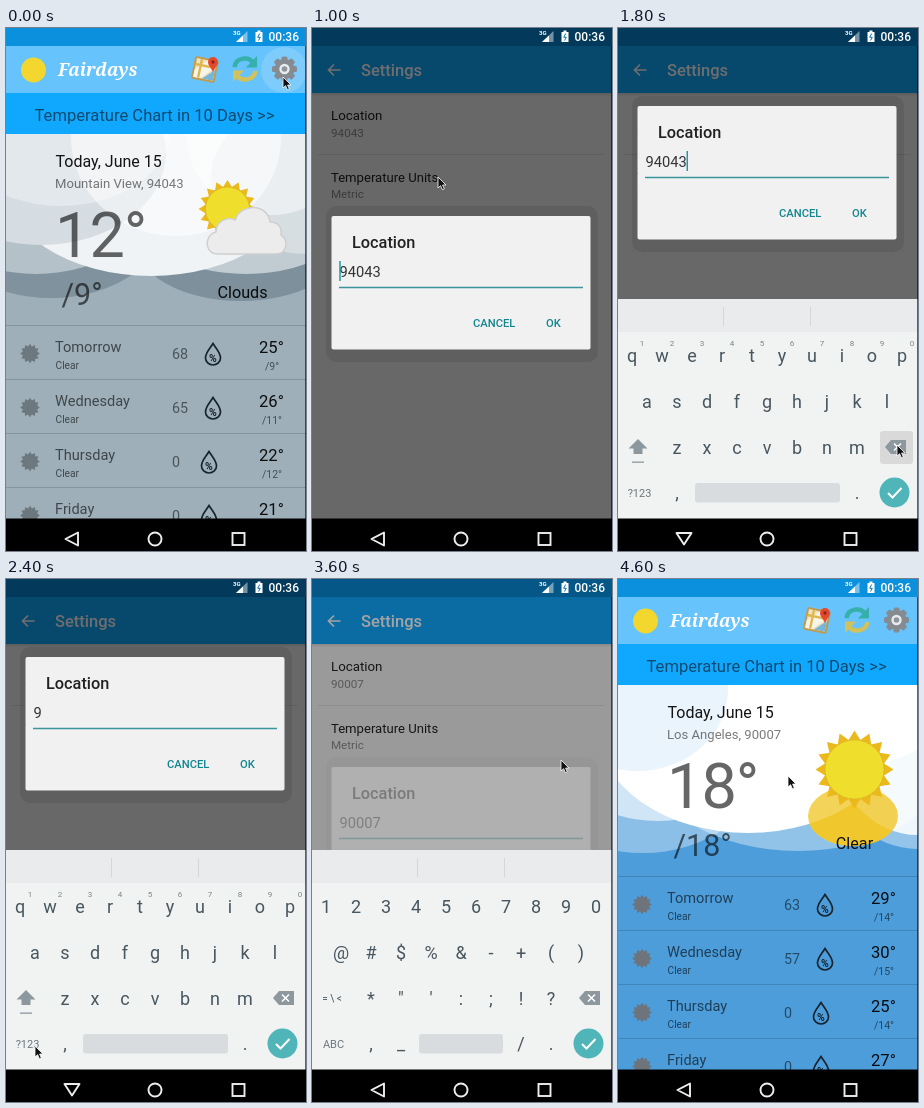
An HTML page for the animation above (4.8 s loop, 300 by 523 pixels).

```html
<!DOCTYPE html>
<html lang="en">
<head>
<meta charset="utf-8">
<title>Weather settings</title>
<style>
  html, body { margin: 0; width: 100%; height: 100%; overflow: hidden; background: #000; }
  svg { display: block; width: 300px; height: 523px; font-family: Roboto, sans-serif; }
</style>
</head>
<body>
<svg id="stage" viewBox="0 0 300 523"></svg>
<script>
const STEP = 200;
const stage = document.getElementById('stage');

const rect = (x, y, w, h, fill, more = '') =>
  `<rect x="${x}" y="${y}" width="${w}" height="${h}" fill="${fill}" ${more}/>`;
const oval = (x, y, rx, ry, fill, more = '') =>
  `<ellipse cx="${x}" cy="${y}" rx="${rx}" ry="${ry}" fill="${fill}" ${more}/>`;
const dot = (x, y, r, fill, more) => oval(x, y, r, r, fill, more);
const path = (d, fill, more = '') => `<path d="${d}" fill="${fill}" ${more}/>`;
const line = (d, color, w = 1.5, more = '') =>
  path(d, 'none', `stroke="${color}" stroke-width="${w}" ${more}`);
const text = (s, x, y, size, fill, more = '') =>
  `<text x="${x}" y="${y}" font-size="${size}" fill="${fill}" ${more}>${
    s.replace(/&/g, '&amp;').replace(/</g, '&lt;')}</text>`;
const MID = 'text-anchor="middle"';
const ink = a => `rgba(0,0,0,${a})`;
const white = a => `rgba(255,255,255,${a})`;

// Star-shaped outline with n points
function star(x, y, r, inner, n, fill) {
  const pts = Array.from({ length: n * 2 }, (_, i) => {
    const a = i * Math.PI / n, d = i % 2 ? inner : r;
    return `${(x + d * Math.sin(a)).toFixed(1)},${(y - d * Math.cos(a)).toFixed(1)}`;
  });
  return `<polygon points="${pts}" fill="${fill}"/>`;
}

const sun = (x, y, r) =>
  star(x, y, r, r * .77, 16, '#ecb91c') + dot(x, y, r * .76, '#efdf2c', 'stroke="#d9b326" stroke-width=".8"');

const cloud = path('M212 226C198 226 198 207 210 204C210 193 222 188 229 192C236 174 262 176 264 194' +
  'C273 194 276 200 275 207C283 212 281 226 270 226Z', '#ececec', 'stroke="#cfcfcf" stroke-width="1.5"');

/* ---------- system bars ---------- */

const statusIcons = text('3G', 227, 7, 6, '#fff', 'font-weight="700"') +
  path('M241.500 3V14H230Z', white(.45)) + path('M237 7.500V14H230Z', '#fff') +
  path('M249.500 4H251.500V2.500H254.500V4H256.500V14H249.500Z', '#fff') +
  line('M253.700 5.500L251.700 9.300H254.300L252.500 12.500', '#0a75b5', 1) +
  text('00:36', 262.5, 13, 12, '#fff', 'font-weight="500"');

function navBar(keysUp) {
  const back = keysUp ? 'M58.500 505H73.500L66 516.500Z' : 'M59.500 511L72 504.500V517.500Z';
  return rect(0, 490.5, 300, 33, '#000') + line(back, '#eee', 1.9, 'stroke-linejoin="round"') +
    dot(149, 511, 6.5, 'none', 'stroke="#eee" stroke-width="1.9"') +
    rect(226.5, 505, 12, 12, 'none', 'stroke="#eee" stroke-width="1.9"');
}

/* ---------- weather page ---------- */

const gear = () => {
  const teeth = Array.from({ length: 8 }, (_, i) =>
    rect(275.5, 28.5, 6, 8, '#858b90', `rx="1.5" transform="rotate(${i * 45} 278.5 41)"`)).join('');
  return teeth + dot(278.5, 41, 10, '#858b90') + dot(278.5, 41, 5.2, '#e8ecee') + dot(278.5, 41, 2.8, '#8f959a');
};

const mapIcon = `<g transform="rotate(12 199 41)">${rect(187, 30, 24, 23, '#c29a4c', 'rx="2"')}${
  rect(189, 32, 20, 19, '#efe3bf')}${path('M189 44L200 32H209V37L196 51H189Z', '#f7f4e8')}${
  line('M194 32V51M189 38H209', '#e0b64e', 2.4)}${path('M198 51L209 40V51Z', '#77b5d9')}</g>` +
  path('M207 44C204 38 202 37 202 34A5 5 0 0 1 212 34C212 37 210 38 207 44Z', '#e4492f') +
  dot(207, 34, 1.7, '#8f2418');

const refreshIcon =
  line('M228.500 39C230 29 243 28 247.500 35', '#35b0aa', 4.5) + path('M251 28V39.500H240Z', '#35b0aa') +
  line('M249.500 43C248 53 235 54 230.500 47', '#d3c25a', 4.5) + path('M227 54V42.500H238Z', '#d3c25a');

const header = rect(0, 0, 300, 18, '#0a90dd') + rect(0, 18, 300, 47, '#66c3fb') +
  dot(27.5, 42, 12.5, '#f3d72f') +
  text('Fairdays', 52, 48, 17.5, '#fff', 'font-family="Noto Serif, serif" font-style="italic" font-weight="700"') +
  mapIcon + refreshIcon + rect(0, 65, 300, 41, '#10a8fe') +
  text('Temperature Chart in 10 Days >>', 28.5, 92.5, 16.6, '#10496f');

const backdrop = {
  cloudy: rect(0, 106, 300, 385, '#9eafb9') +
    oval(45, 190, 115, 80, '#80929d') + oval(235, 215, 105, 58, '#7e909b') +
    oval(30, 160, 120, 86, '#b4c1c9') + oval(240, 170, 120, 76, '#c0ccd2') +
    oval(145, 150, 150, 98, '#f0f3f5') + oval(300, 150, 95, 76, '#d6dee2') +
    oval(35, 125, 125, 92, '#d5dde2') + oval(170, 110, 105, 98, white(.55)) +
    oval(265, 105, 85, 82, white(.5)) + oval(55, 100, 110, 78, white(.3)),
  clear: rect(0, 106, 300, 385, '#4d9dda') +
    oval(25, 190, 115, 84, white(.35)) + oval(180, 180, 150, 92, white(.38)) +
    oval(300, 185, 85, 85, white(.4)) + oval(235, 237, 45, 30, '#f1c92f') +
    oval(40, 150, 115, 92, white(.6)) + oval(130, 150, 150, 104, '#fff') +
    oval(300, 160, 85, 96, white(.85)) + oval(170, 108, 180, 90, '#fff') +
    oval(20, 110, 90, 82, '#eaf4fc') + oval(235, 237, 45, 30, 'rgba(241,201,47,.8)')
};

const drop = line('M207 315.500C203 322 199.500 325 199.500 330A7.500 7 0 0 0 214.500 330C214.500 325 211 322 207 315.500Z',
  '#17242d', 1.7) + text('%', 207, 333.5, 10.5, '#17242d', MID + ' font-weight="700"');

function dayRow(i, [name, rain, high, low], color) {
  const shift = rain.length > 1 ? 0 : -4;
  return `<g transform="translate(0 ${i * 54})">` +
    line('M0 297.500H300', ink(.16), 1) +
    star(24, 325.5, 9.8, 7.3, 12, color) +
    text(name, 49, 324, 14.6, ink(.6)) + text('Clear', 49.5, 341, 10.2, ink(.6)) +
    text(rain, 166, 331, 14.3, ink(.52)) + `<g transform="translate(${shift} 0)">${drop}</g>` +
    text(high, 253, 324.5, 16.6, ink(.92)) + text(low, 266, 341.5, 10.5, ink(.56), MID) + '</g>';
}

const cities = [
  { sky: 'cloudy', place: 'Mountain View, 94043', now: '12°', low: '/9°', word: 'Clouds', gray: '#6c777e',
    days: [['Tomorrow', '68', '25°', '/9°'], ['Wednesday', '65', '26°', '/11°'],
           ['Thursday', '0', '22°', '/12°'], ['Friday', '0', '21°', '/12°']] },
  { sky: 'clear', place: 'Los Angeles, 90007', now: '18°', low: '/18°', word: 'Clear', gray: '#6e747b',
    days: [['Tomorrow', '63', '29°', '/14°'], ['Wednesday', '57', '30°', '/15°'],
           ['Thursday', '0', '25°', '/14°'], ['Friday', '0', '27°', '/14°']] }
];

function weather(c, glow) {
  return backdrop[c.sky] + header +
    (glow ? dot(278, 42, 23, white(.15)) : '') + gear() +
    text('Today, June 15', 49.5, 139, 16, ink(.92)) +
    text(c.place, 49, 160, 13.1, ink(.52)) +
    text(c.now, 49, 229, 63, ink(.6), 'letter-spacing="-1"') +
    text(c.low, 55.5, 277, 30.5, ink(.6)) +
    (c.sky === 'clear' ? sun(236.5, 190.5, 39) : sun(221.5, 181, 29) + cloud) +
    text(c.word, 236.5, 269.5, 16.2, ink(.92), MID) +
    c.days.map((d, i) => dayRow(i, d, c.gray)).join('');
}

/* ---------- settings page ---------- */

function settings(zip, press) {
  const shade = [.1, .06, .03].map((a, i) => rect(0, 65 + i, 300, 1, ink(a))).join('');
  return rect(0, 0, 300, 491, '#f1f1f1') + rect(0, 0, 300, 18, '#0788d3') +
    rect(0, 18, 300, 47, '#10a8fe') + shade +
    (press === 'back' ? dot(22, 42, 23, white(.2)) : '') +
    (press === 'row' ? rect(6, 66, 286, 60, ink(.08)) : '') +
    line('M28.500 42H17M22 36.500L16.500 42L22 47.500', '#fff', 1.7) +
    text('Settings', 49, 48, 16.5, '#fff', 'font-weight="500"') +
    text('Location', 19, 92, 13.3, '#212121') + text(zip, 19, 109, 11.7, '#8a8a8a') +
    line('M6 126.500H292', '#dcdcdc', 1) +
    text('Temperature Units', 19, 153.5, 13.1, '#212121') + text('Metric', 19, 170, 11.6, '#8a8a8a');
}

function dialog(y, zip, caret, handle) {
  const end = 28 + zip.length * 8.25;
  const at = caret === 'start' ? 28 : end;
  return rect(14, y - 10, 272, 156, ink(.09), 'rx="10"') + rect(19.5, y, 259, 133.5, '#f1f1f1', 'rx="2"') +
    text('Location', 40, y + 32, 16.3, '#212121', 'font-weight="500"') +
    text(zip, 27.5, y + 61, 14.7, '#333') +
    line(`M27 ${y + 71.5}H271`, '#3b949c', 1.3) +
    (caret ? rect(at - .7, y + 45, 1.4, 20, '#0e98a2') : '') +
    (handle ? path(`M${at} ${y + 67}l6 6a8 8 0 1 1 -12 0Z`, '#1a9ba5') : '') +
    ['CANCEL', 'OK'].map((s, i) =>
      text(s, i ? 234 : 161, y + 111, 11.2, '#12868f', 'font-weight="500"')).join('');
}

/* ---------- keyboard ---------- */

const layouts = {
  abc: { rows: ['qwertyuiop', 'asdfghjkl', 'zxcvbnm'], mode: '?123', bar: [77, 145], extra: '' },
  sym: { rows: ['1234567890', '@#$%&-+()', '*"\':;!?'], mode: 'ABC', bar: [107, 84], extra: '_/' }
};
const KEY = '#47565f';

function keyboard(kind, press, tint) {
  const k = layouts[kind];
  const rows = k.rows.map((row, r) => [...row].map((ch, i) =>
    text(ch, [14, 29, 59][r] + 30 * i, [334, 380, 426][r], 18, KEY, MID)).join('')).join('');
  const hints = kind === 'abc' ? [...'1234567890'].map((ch, i) =>
    text(ch, 24 + 30 * i, 318, 8, '#78858c', MID)).join('') : '';
  const left = kind === 'abc'
    ? path('M20 411L29.500 420.500H24.500V426H15.500V420.500H10.500Z', '#8c989e') + rect(14, 433.5, 12, 1.3, '#8c989e')
    : text('= \\ <', 20, 423, 10, KEY, MID);
  const held = press === 'del' ? rect(262, 403, 33, 33, ink(.1), 'rx="3"')
    : press === 'zero' ? rect(270, 307, 27, 41, ink(.1), 'rx="3"') : '';
  return rect(0, 271, 300, 220, tint || '#f1f2f2') + rect(0, 271, 300, 33, tint ? '#e7ebee' : '#e9ebec') +
    line('M105.500 279V298M192.500 279V298', '#d3d7d9', 1) + held + rows + hints + left +
    path('M267 419L273 412H288V426H273Z', '#8c989e') + line('M276 415.500L283 422.500M283 415.500L276 422.500', '#fff', 1.5) +
    text(k.mode, 21.5, 469, 11, '#6a777e', MID) + text(',', 59, 471, 18, KEY, MID) +
    [...k.extra].map((ch, i) => text(ch, [89, 209][i], 471, 18, KEY, MID)).join('') +
    rect(k.bar[0], 455, k.bar[1], 19.5, '#d8dcde', 'rx="3"') + text('.', 239, 471, 18, KEY, MID) +
    dot(276.5, 464.5, 15, '#4fb5b9') + line('M270 465L274.500 469.500L283.500 460', '#fff', 2);
}

/* ---------- timeline ---------- */

const OLD = '94043', NEW = '90007', DIM = .57;
const entry = (zip, o = {}) => ({ page: 'settings', zip: OLD, box: 78, field: zip, keys: 'abc', dim: DIM, ...o });
const set = (o = {}) => ({ page: 'settings', zip: OLD, ...o });

// One entry per step: pointer x, pointer y, state
const steps = [
  [277, 49, { page: 'weather', city: 0, press: 'gear' }],
  [211, 107, { page: 'weather', city: 0 }],
  [163, 121, set()],
  [104, 97, set()],
  [98, 94, set({ press: 'row' })],
  [126, 149, set({ box: 188, field: OLD, caret: 'start', dim: DIM })],
  [110, 207, entry(OLD, { tint: '#edf1f4' })],
  [75, 140, entry(OLD, { caret: 'end', handle: true })],
  [281, 386, entry(OLD)],
  [279, 417, entry(OLD, { press: 'del', caret: 'end' })],
  [279, 417, entry('94', { press: 'del', caret: 'end' })],
  [82, 470, entry('9', { caret: 'end' })],
  [29, 467, entry('9')],
  [250, 345, entry('9', { keys: 'sym', caret: 'end' })],
  [284, 335, entry('90', { keys: 'sym', press: 'zero', caret: 'end' })],
  [195, 335, entry('9000', { keys: 'sym', caret: 'end' })],
  [266, 465, entry(NEW, { keys: 'sym' })],
  [243, 186, entry(NEW, { keys: 'sym', caret: 'end' })],
  [249, 181, set({ zip: NEW, box: 188, field: NEW, keys: 'sym', dim: .36, fade: .25, closing: true })],
  [160, 34, set({ zip: NEW })],
  [25, 37, set({ zip: NEW })],
  [23, 36, set({ zip: NEW, press: 'back' })],
  [86, 89, { page: 'weather', city: 1 }],
  [170, 197, { page: 'weather', city: 1 }]
];

function scene([x, y, s]) {
  let out = s.page === 'weather' ? weather(cities[s.city], s.press === 'gear') : settings(s.zip, s.press);
  if (s.dim) out += rect(0, 0, 300, 491, ink(s.dim));
  if (s.box) out += `<g opacity="${s.fade || 1}">${dialog(s.box, s.field, s.caret, s.handle)}</g>`;
  if (s.keys) out += keyboard(s.keys, s.press, s.tint);
  return out + statusIcons + navBar(s.keys && !s.closing) + rect(299, 18, 1, 473, '#000', 'opacity=".6"') +
    path('M0 0V11L2.600 8.700L4.400 12.700L6.300 11.900L4.600 8H8Z', '#111',
      `stroke="#fff" stroke-width=".8" transform="translate(${x} ${y})"`);
}

const start = performance.now();
let shown = -1;

function tick() {
  const i = Math.floor(Math.max(0, performance.now() - start) / STEP) % steps.length;
  if (i !== shown) {
    stage.innerHTML = scene(steps[i]);
    shown = i;
  }
  requestAnimationFrame(tick);
}
tick();
</script>
</body>
</html>
```
